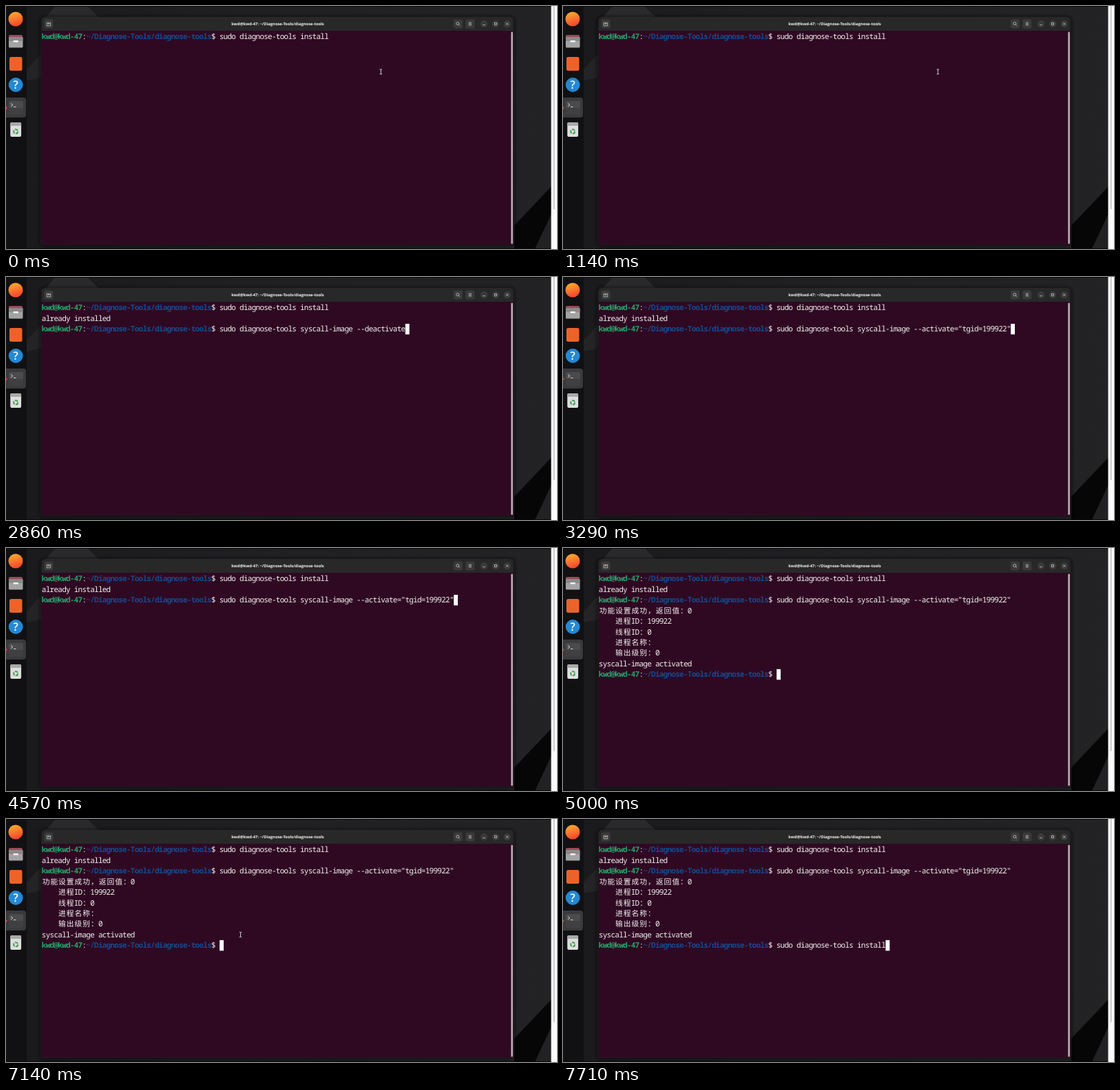
Recreate the animation shown at these times as an HTML page. Size 800x353 px, loop 8 s.

```html
<!DOCTYPE html>
<html lang="zh-CN">
<head>
<meta charset="utf-8">
<title>Terminal session</title>
<style>
html, body { margin: 0; width: 100%; height: 100%; overflow: hidden; background: #1c1c1f; }
svg { display: block; width: 100vw; height: 100vh; }
text { white-space: pre; text-rendering: geometricPrecision; }
#term text { font: 11px "Noto Sans Mono", "Noto Sans CJK SC", "Noto Sans CJK", monospace; text-anchor: middle; fill: #f4f2f3; }
#term .user { fill: #26a269; font-weight: 700; }
#term .path { fill: #154a8d; font-weight: 700; }
#term .cjk { font: 10.8px "Noto Sans CJK SC", "Noto Sans CJK", sans-serif; }
#title { font: 700 5.8px "Open Sans", "Noto Sans", sans-serif; fill: #f2f2f2; text-anchor: middle; }
</style>
</head>
<body>
<svg viewBox="0 0 800 353" preserveAspectRatio="none" xmlns="http://www.w3.org/2000/svg">
  <defs>
    <linearGradient id="desk" x2="1">
      <stop stop-color="#1a1a1c"/><stop offset=".5" stop-color="#201f22"/><stop offset="1" stop-color="#232225"/>
    </linearGradient>
    <linearGradient id="fire" x2=".3" y2="1">
      <stop stop-color="#ffb52e"/><stop offset="1" stop-color="#f5492f"/>
    </linearGradient>
    <filter id="soft" x="-5%" y="-5%" width="110%" height="112%"><feGaussianBlur stdDeviation="2"/></filter>
  </defs>

  <!-- desktop -->
  <rect width="800" height="353" fill="url(#desk)"/>
  <path d="M72 0H118L134 16H58Z" fill="#2a292c"/>
  <path d="M30 92L52 68V104L30 108Z" fill="#242326"/>
  <path d="M792 262L738 319V353H768L792 302Z" fill="#060607"/>
  <path d="M792 302L768 353H792Z" fill="#222124"/>

  <!-- dock -->
  <rect width="30" height="353" fill="#111113"/>
  <path d="M0 0H792V1H0ZM0 352H792V353H0Z" fill="#09090a"/>
  <circle cx="14" cy="19" r="10.5" fill="url(#fire)"/>
  <g>
    <path d="M4 44Q4 42 6 42H22Q24 42 24 44V50H4Z" fill="#9c4a58"/>
    <rect x="4" y="45" width="20.5" height="15.5" rx="1.5" fill="#a3a3a3"/>
    <rect x="4" y="45" width="20.5" height="6" rx="1.5" fill="#8a8a8a"/>
    <rect x="10.5" y="50" width="7.5" height="2.4" rx="1" fill="#f3f3f3"/>
  </g>
  <rect x="5" y="74" width="18.5" height="20" rx="2.5" fill="#ec6329"/>
  <circle cx="14.2" cy="114.5" r="10.4" fill="#2488d3"/>
  <text x="14.2" y="120.3" text-anchor="middle" fill="#fff" style="font:600 16px 'Open Sans',sans-serif">?</text>
  <rect x="-3" y="133" width="32" height="29" rx="4" fill="#3a3a3c"/>
  <rect x="4" y="138" width="21" height="19.5" rx="2" fill="#4b4b4d"/>
  <path d="M4 148H25V155.5Q25 157.5 23 157.5H6Q4 157.5 4 155.5Z" fill="#404042"/>
  <path d="M7 141.5L10 143.7L7 146M11 146.6H14.5" fill="none" stroke="#e4e4e4" stroke-width=".9"/>
  <circle cx="0" cy="148" r="1.7" fill="#d9442c"/>
  <rect x="6.3" y="169" width="15.8" height="21" rx="2" fill="#dedede"/>
  <path d="M6.3 174V171Q6.3 169 8.3 169H20.1Q22.1 169 22.1 171V174Z" fill="#a9a9a9"/>
  <circle cx="14.2" cy="182.3" r="3" fill="none" stroke="#3f9a4a" stroke-width="1.9" stroke-dasharray="4.7 1.58"/>

  <!-- side page -->
  <rect x="791.5" width="8.5" height="353" fill="#fafafa"/>
  <rect x="795" width="1.5" height="295" fill="#bdbdbd"/>

  <!-- window -->
  <rect x="49" y="15" width="690" height="335" rx="7" fill="#08080a" opacity=".65" filter="url(#soft)"/>
  <path d="M51.5 346.5V22Q51.5 16 57.5 16H730.5Q736.5 16 736.5 22V346.5Z" fill="#282829"/>
  <rect x="51.5" y="36" width="685" height="310.5" fill="#2f0922"/>
  <rect x="733.3" y="37.5" width="2.6" height="308" rx="1.3" fill="#b9b1b7"/>
  <g fill="#3a3a3b">
    <rect x="55.5" y="19.5" width="13" height="13" rx="2.5"/>
    <rect x="649.8" y="19.5" width="13" height="13" rx="2.5"/>
    <rect x="667.3" y="19.5" width="13" height="13" rx="2.5"/>
    <circle cx="694" cy="26" r="5.2"/><circle cx="711" cy="26" r="5.2"/><circle cx="727.7" cy="26" r="5.2"/>
  </g>
  <g fill="none" stroke="#ddd" stroke-width=".7">
    <path d="M60.5 24H59.3V28.8H64.7V24H63.5M62 23.3V27.2M60.3 25.4H63.7"/>
    <circle cx="655.8" cy="25.5" r="2"/><path d="M657.3 27L659 28.7"/>
    <path d="M671.7 24.2H675.9M671.7 26H675.9M671.7 27.8H675.9"/>
    <path d="M692.2 27.4H695.8"/>
    <rect x="709.4" y="24.4" width="3.2" height="3.2"/>
    <path d="M726 24.3L729.4 27.7M729.4 24.3L726 27.7"/>
  </g>
  <text id="title" x="394.5" y="28"></text>

  <g id="term"></g>
  <rect id="caret" width="5.9" height="15.4" fill="#fff"/>
  <path id="mouse" d="M-1.7-3.7Q0-3.7 0-2.5Q0-3.7 1.7-3.7M0-2.8V2.8M-1.7 3.7Q0 3.7 0 2.5Q0 3.7 1.7 3.7" fill="none" stroke="#e8e4e7" stroke-width=".9"/>
</svg>
<script>
const LOOP = 8000, LEFT = 52.2, TOP = 37.1, CELL = 5.862, ROW = 15.43, START = 44;
const USER = "kwd@kwd-47", PATH = "~/Diagnose-Tools/diagnose-tools";
const TOOL = "sudo diagnose-tools ", IMAGE = TOOL + "syscall-image --";
const INSTALL = TOOL + "install", ACTIVATE = IMAGE + 'activate="tgid=199922"';

const $ = id => document.getElementById(id);
const isWide = ch => ch > "\u2e80";
const colX = col => LEFT + col * CELL;
const rowY = row => TOP + row * ROW;

// Places each character in its terminal cell; wide ones take two.
function write(el, str, col) {
  const xs = [...str].map(ch => {
    const span = isWide(ch) ? 2 : 1, x = colX(col + span / 2);
    col += span;
    return x.toFixed(2);
  });
  el.setAttribute("x", xs.join(" "));
  el.textContent = str;
  return col;
}

function addText(parent, row, cls = "") {
  const el = document.createElementNS("http://www.w3.org/2000/svg", "text");
  el.setAttribute("y", (rowY(row) + 11.3).toFixed(2));
  el.setAttribute("class", cls);
  parent.append(el);
  return el;
}

function addGroup() {
  const g = document.createElementNS("http://www.w3.org/2000/svg", "g");
  $("term").append(g);
  return g;
}

function addLine(g, row, str, col = 0) {
  for (const part of str.match(/[\u2e80-\uffff]+|[^\u2e80-\uffff]+/g))
    col = write(addText(g, row, isWide(part[0]) ? "cjk" : ""), part, col);
}

function addPrompt(g, row) {
  write(addText(g, row, "user"), USER, 0);
  write(addText(g, row), ":", 10);
  write(addText(g, row, "path"), PATH, 11);
  write(addText(g, row), "$", 42);
}

// Each stage holds the lines that appear after Enter, ending in a prompt.
const promptRows = [0, 2, 9];
const stages = promptRows.map(row => {
  const g = addGroup();
  addPrompt(g, row);
  return { g, input: addText(g, row) };
});
addLine(stages[1].g, 1, "already installed");
addLine(stages[2].g, 3, "功能设置成功，返回值：0");
["进程ID：199922", "线程ID：0", "进程名称：", "输出级别：0"]
  .forEach((s, i) => addLine(stages[2].g, 4 + i, s, 4));
addLine(stages[2].g, 8, "syscall-image activated");
$("title").textContent = USER + ": " + PATH;

const entered = [INSTALL, ACTIVATE];
// time, stage, typed command, caret shown
const steps = [
  [0, 0, INSTALL, 0], [570, 0, INSTALL, 1], [1140, 0, INSTALL, 0],
  [1710, 1, "", 1], [2430, 1, INSTALL, 1], [2570, 1, "clear", 1],
  [2860, 1, IMAGE + "deactivate", 1], [3000, 1, IMAGE + "report", 1],
  [3290, 1, ACTIVATE, 1], [3860, 1, ACTIVATE, 0], [4570, 1, ACTIVATE, 1],
  [4710, 2, "", 1], [5290, 2, "", 0], [6000, 2, "", 1], [6570, 2, "", 0],
  [7140, 2, "", 1], [7290, 2, ACTIVATE, 1], [7710, 2, INSTALL, 1]
];
// time, x, y; no position means hidden
const pointer = [
  [0, 544.3, 95.5], [1710], [5570, 490.5, 93.5],
  [5710, 365.5, 145], [5860, 340.5, 168], [7290]
];

const at = (table, t) => table.findLast(s => s[0] <= t);
let lastStep, lastPointer;

function showStep([, stage, cmd, caret]) {
  stages.forEach(({ g, input }, i) => {
    g.style.display = i <= stage ? "" : "none";
    write(input, i < stage ? entered[i] : i === stage ? cmd : "", START);
  });
  $("caret").setAttribute("x", colX(START + cmd.length));
  $("caret").setAttribute("y", rowY(promptRows[stage]));
  $("caret").style.display = caret ? "" : "none";
}

function showPointer([, x, y]) {
  $("mouse").style.display = x ? "" : "none";
  if (x) $("mouse").setAttribute("transform", `translate(${x} ${y})`);
}

function frame() {
  const t = performance.now() % LOOP;
  const step = at(steps, t), spot = at(pointer, t);
  if (step !== lastStep) showStep(lastStep = step);
  if (spot !== lastPointer) showPointer(lastPointer = spot);
  requestAnimationFrame(frame);
}
frame();
</script>
</body>
</html>
```
